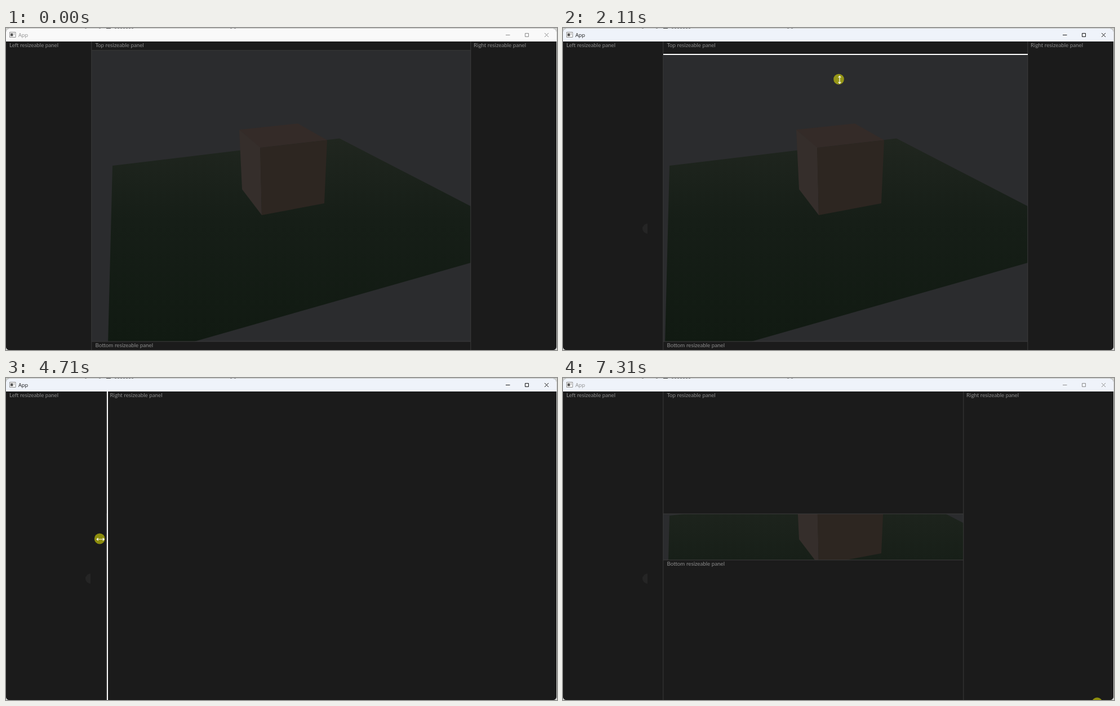
Animation, 978 px wide and 573 px high, one loop 7350 ms. Source, as an HTML page:

```html
<!DOCTYPE html>
<html lang="en">
<head>
<meta charset="utf-8">
<title>Resizable panels</title>
<style>
  html, body { margin: 0; width: 100%; height: 100%; overflow: hidden; }
  body { position: relative; background: #d3d4d1; }
  #stage { position: absolute; left: 0; top: 0; width: 978px; height: 573px; overflow: hidden; }
  #stage * { box-sizing: border-box; }
  svg { position: absolute; left: 0; top: 0; overflow: visible; }

  .window { position: absolute; inset: 0; background: #2b2c2e; clip-path: inset(1px 1px 0 0 round 6px); }
  .title {
    position: absolute; left: 0; top: 0; width: 978px; height: 24px;
    background: #f9f9f9; color: #8b8b8b;
    font: 9.2px/24px "Open Sans", "Noto Sans", sans-serif;
  }
  .used .title { background: #eff3fa; }
  .active .title { color: #151515; }
  .title span { position: absolute; left: 22px; top: 1px; }

  .panel {
    position: absolute; overflow: hidden; background: #1b1b1b; color: #8c8c8c;
    padding: 1px 6px 0; overflow-wrap: anywhere;
    font: 9.77px/10.65px Lato, "Noto Sans", sans-serif;
  }
  .left { left: 0; top: 24px; bottom: 0; width: calc(var(--l) * 1px); }
  .right { left: calc(var(--r) * 1px); top: 24px; bottom: 0; right: 0; padding-left: 5px; }
  .top, .bottom { left: calc(var(--l) * 1px); width: calc((var(--r) - var(--l)) * 1px); padding-left: 6.5px; }
  .top { top: 24px; height: calc((var(--t) - 24) * 1px); }
  .bottom { top: calc(var(--b) * 1px); bottom: 0; }

  .line { position: absolute; background: #3b3b3b; --w: 1.4px; }
  .line.hot { background: #fff; --w: 2px; z-index: 1; }
  .line.v { top: 24px; bottom: 0; width: var(--w); transform: translateX(-50%); }
  .line.h { left: calc(var(--l) * 1px); width: calc((var(--r) - var(--l)) * 1px); height: var(--w); transform: translateY(-50%); }
  #lineL { left: calc(var(--l) * 1px); }
  #lineR { left: calc(var(--r) * 1px); }
  #lineT { top: calc(var(--t) * 1px); }
  #lineB { top: calc(var(--b) * 1px); }

  .ghost {
    position: absolute; left: 141px; top: 348px; width: 9px; height: 18px;
    border-radius: 9px 0 0 9px; background: #252525; visibility: hidden;
  }
  .used .ghost { visibility: visible; }
</style>
</head>
<body>
<div id="stage">
  <svg width="978" height="3" fill="#777">
    <path d="M0 .5H978" stroke="#c4c6c2"/>
    <path d="M140 0h3v1h-3zM165 0h3v1h-3zM398 0h3v1h-3zM405 0h3v1h-3z"/>
    <path d="M178 0h8v1h-8z" fill="#333"/>
    <path d="M193 .5h34" stroke="#666" stroke-dasharray="3 2"/>
  </svg>
  <div class="window">
    <svg width="978" height="573">
      <defs>
        <linearGradient id="grass" gradientUnits="userSpaceOnUse" x1="0" y1="196" x2="0" y2="557">
          <stop offset="0" stop-color="#20261f"/>
          <stop offset=".4" stop-color="#161e17"/>
          <stop offset="1" stop-color="#111a12"/>
        </linearGradient>
      </defs>
      <path d="M189 245L592 196.500L950 382L180 602Z" fill="url(#grass)"/>
      <path d="M414 181L518 170L570 199.500L451 213Z" fill="#342b28"/>
      <path d="M414 181L451.500 213L454 333L419 287Z" fill="#352e2b"/>
      <path d="M451 213L570 199.500L565 312L454 333Z" fill="#2d2621"/>
    </svg>

    <div class="panel top">Top resizeable panel</div>
    <div class="panel bottom">Bottom resizeable panel</div>
    <div class="panel left">Left resizeable panel</div>
    <div class="panel right">Right resizeable panel</div>
    <div class="ghost"></div>
    <div class="line h" id="lineT"></div>
    <div class="line h" id="lineB"></div>
    <div class="line v" id="lineL"></div>
    <div class="line v" id="lineR"></div>

    <div class="title">
      <svg width="978" height="24" fill="none" stroke="currentColor">
        <path d="M6.500 7.500h10.500v9h-10.500z" fill="#fff" stroke="#8a8a8a"/>
        <path d="M8 9.500h4.500v5H8z" fill="#555" stroke="none"/>
        <path d="M14.500 9v3" stroke="#999"/>
        <path d="M887 12.500h7.500M921.500 9.500h6v6h-6zM956 9l7 7M963 9l-7 7"/>
      </svg>
      <span>App</span>
    </div>
  </div>

  <svg id="pointer" width="1" height="1">
    <circle id="halo" r="9.4" fill="#ff0" fill-opacity=".5"/>
    <path id="arrow" d="M0 0V11.500L2.700 9L4.500 13L6.200 12.200L4.500 8.300H8Z" fill="#fff" stroke="#222" stroke-width=".6"/>
    <path id="resize" d="M-6 0H6M-4 -2.300L-6.500 0L-4 2.300M4 -2.300L6.500 0L4 2.300" fill="none" stroke="#fff" stroke-width="1.2"/>
  </svg>
</div>

<script>
  const LOOP = 7350, LAG = 40, SQUEEZED = 4650;
  const $ = id => document.getElementById(id);
  const stage = $('stage');

  // Pointer moves, one list per dragged edge: [ms, x, y]
  const leftDrag = [
    [50, 948, 580], [400, 480, 420], [660, 152, 357], [820, 152, 357], [1000, 415, 353],
    [1030, 405, 352], [1110, 243.5, 350], [1200, 180, 345], [1320, 178, 335]
  ];
  const topDrag = [
    [1540, 400, 120], [1840, 488, 40], [1980, 488, 40], [2070, 489, 46], [2110, 489.5, 90],
    [2240, 490, 235], [2300, 490, 258], [2460, 490, 168], [2510, 490, 168]
  ];
  const bottomDrag = [
    [2710, 491, 545], [2780, 491, 557.5], [3190, 491, 557.5], [3360, 505, 345], [3500, 512, 419], [3540, 512, 419]
  ];
  const rightDrag = [
    [3780, 816, 294.5], [3840, 825, 295], [3970, 825, 295], [4350, 430, 290], [4660, 178, 288],
    [4710, 166.5, 286], [4950, 105, 284], [5200, 200, 300], [5420, 485, 312], [5700, 780, 322],
    [6070, 934.5, 326.5], [6200, 940, 327], [6560, 711, 325], [6640, 711, 325]
  ];
  const leave = [[6930, 952, 559], [7040, 952, 580], [7200, 948, 578]];
  const path = [].concat(leftDrag, topDrag, bottomDrag, rightDrag, leave);

  // Time spans: [from, to]
  const hot = {
    lineL: [[640, 1340]],
    lineT: [[1790, 2510]],
    lineB: [[2770, 3530], [6640, 6700]],
    lineR: [[3770, 6650]]
  };
  const pressed = [[740, 1320], [1980, 2500], [3190, 3520], [3970, 6640], [7240, LOOP]];
  const sideways = [[640, 1340], [3770, 6660]];
  const upright = [[1780, 2520], [2740, 3540]];

  const within = (spans, t) => spans.some(([from, to]) => t >= from && t < to);
  const clamp = (v, min, max) => Math.min(max, Math.max(min, v));
  const show = (id, on) => $(id).setAttribute('visibility', on ? 'visible' : 'hidden');

  function pointer(t) {
    const i = path.findIndex(key => key[0] > t);
    if (i <= 0) return path.at(i).slice(1);
    const [t0, x0, y0] = path[i - 1], [t1, x1, y1] = path[i];
    const k = (t - t0) / (t1 - t0);
    return [x0 + (x1 - x0) * k, y0 + (y1 - y0) * k];
  }

  // An edge trails the pointer while it is dragged
  const trail = (t, from, to) => pointer(clamp(t - LAG, from, to));

  function draw(t) {
    const l = trail(t, 820, 1320)[0];
    const r = clamp(trail(t, 3970, 6640)[0], l + 1.5, 904.5);
    // Text wrapped to single letters pushes both panels open for good
    const squeezed = t >= SQUEEZED;
    const edges = {
      l, r,
      t: squeezed ? 241.5 : trail(t, 1980, 2510)[1],
      b: squeezed ? 324 : trail(t, 3190, 3540)[1]
    };
    for (const name in edges) stage.style.setProperty('--' + name, edges[name]);
    for (const id in hot) $(id).classList.toggle('hot', within(hot[id], t));
    stage.classList.toggle('used', t >= 760);
    stage.classList.toggle('active', t >= 760 && t < 7270);

    const [x, y] = pointer(t);
    const ew = within(sideways, t), ns = within(upright, t);
    $('pointer').style.transform = `translate(${x}px, ${y}px)`;
    $('resize').setAttribute('transform', `translate(1.5 1) rotate(${ns ? 90 : 0})`);
    show('resize', ew || ns);
    show('arrow', !ew && !ns);
    show('halo', within(pressed, t));
  }

  const start = performance.now();
  function tick() {
    draw((performance.now() - start) % LOOP);
    requestAnimationFrame(tick);
  }
  tick();
</script>
</body>
</html>
```
